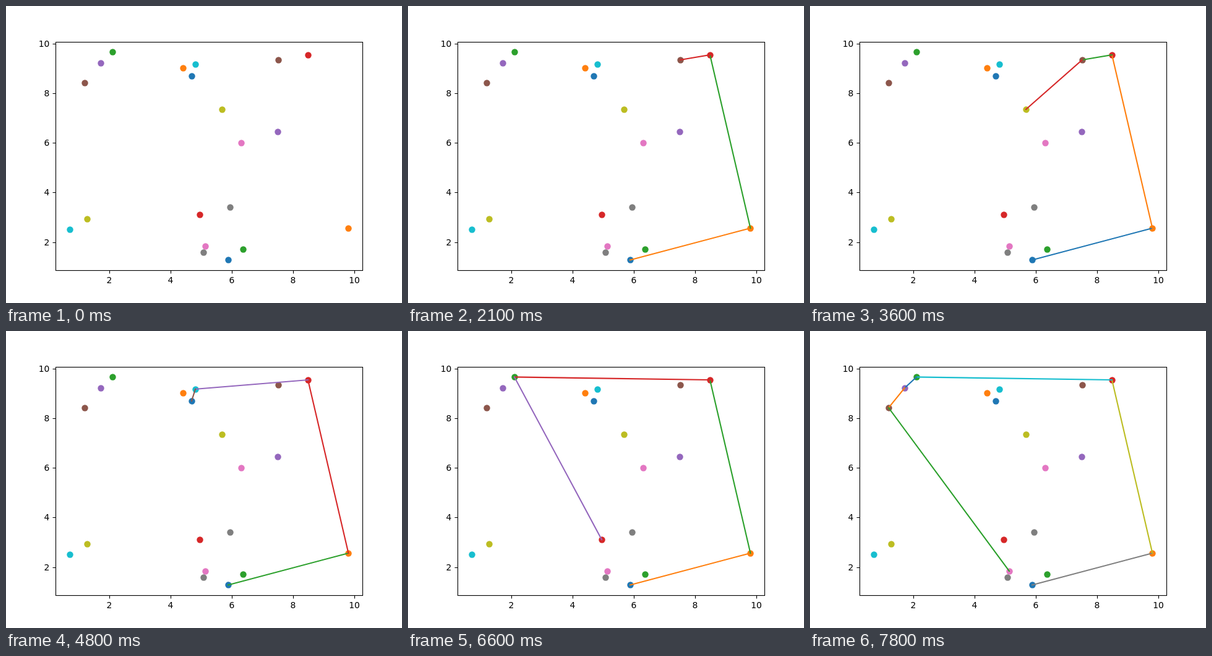
An HTML page that plays this animation: 640 by 480 pixels, repeating every 8 s.

```html
<!DOCTYPE html>
<html lang="en">
<head>
<meta charset="utf-8">
<title>Convex hull scan</title>
<style>
  html, body { margin: 0; width: 100%; height: 100%; overflow: hidden; background: #fff; }
  svg { display: block; width: 640px; height: 480px; }
  .axes { fill: none; stroke: #000; stroke-width: 1.11; }
  .hull { fill: none; stroke-width: 2.083; stroke-linecap: square; }
  text { font: 13.89px "DejaVu Sans", sans-serif; fill: #000; }
</style>
</head>
<body>
<svg viewBox="0 0 640 480">
  <g class="dots"></g>
  <g class="hull"></g>
  <g class="axes"><rect x="80.5" y="58.5" width="496" height="369"/></g>
  <g class="labels"></g>
</svg>
<script>
const STEP = 300, LOOP = 8000;
const COLORS = ['#1f77b4', '#ff7f0e', '#2ca02c', '#d62728', '#9467bd',
                '#8c564b', '#e377c2', '#7f7f7f', '#bcbd22', '#17becf'];

// Lowest point first, the rest sorted by angle around it
const points = [
  [359, 410.4], [553.4, 359], [383, 393], [488, 79], [439, 203],
  [440, 87], [380, 221], [362, 325], [349, 167], [306, 94],
  [300, 113], [286, 100], [172, 74.4], [313, 337], [153, 92],
  [127, 124], [322, 388], [319, 398], [131, 344], [102.6, 361]
];

const group = name => document.querySelector('.' + name);
const color = i => COLORS[i % COLORS.length];
const snap = v => Math.round(v) + 0.5;

function add(parent, tag, attrs, text = '') {
  const el = document.createElementNS('http://www.w3.org/2000/svg', tag);
  for (const key in attrs) el.setAttribute(key, attrs[key]);
  el.textContent = text;
  parent.append(el);
}

function drawAxes() {
  const axes = group('axes'), labels = group('labels');
  for (let i = 0; i < 5; i++) {
    const x = 167 + 99 * i, y = Math.round(381.6 - 80.2 * i), value = 2 * i + 2;
    add(axes, 'path', { d: `M${x + 0.5} 427.5v5M80.5 ${y + 0.5}h-5` });
    add(labels, 'text', { x, y: 448, 'text-anchor': 'middle' }, value);
    add(labels, 'text', { x: 70.3, y: y + 5, 'text-anchor': 'end' }, value);
  }
}

function drawDots() {
  points.forEach(([x, y], i) =>
    add(group('dots'), 'circle', { cx: snap(x), cy: snap(y), r: 5.2, fill: color(i) }));
}

// True when a, b, c turn counter-clockwise on screen
function turnsLeft(a, b, c) {
  return (b[0] - a[0]) * (c[1] - b[1]) < (b[1] - a[1]) * (c[0] - b[0]);
}

// Graham scan: one state per push or pop; the colour cycle runs on across states
function scan() {
  const states = [], stack = [];
  let used = 0;
  const save = () => {
    states.push({ path: [...stack], first: used });
    used += stack.length - 1;
  };
  for (const p of points) {
    while (stack.length > 1 && !turnsLeft(stack.at(-2), stack.at(-1), p)) {
      stack.pop();
      save();
    }
    stack.push(p);
    save();
  }
  return states;
}

function drawHull({ path, first }) {
  const hull = group('hull');
  hull.replaceChildren();
  for (let i = 1; i < path.length; i++) {
    const [[x1, y1], [x2, y2]] = [path[i - 1], path[i]];
    add(hull, 'line', { x1, y1, x2, y2, stroke: color(first + i - 1) });
  }
}

drawAxes();
drawDots();
const states = scan();
const start = performance.now();
let shown = -1;

function tick() {
  const step = Math.floor(((performance.now() - start) % LOOP) / STEP);
  if (step !== shown) drawHull(states[shown = step]);
  requestAnimationFrame(tick);
}
tick();
</script>
</body>
</html>
```
